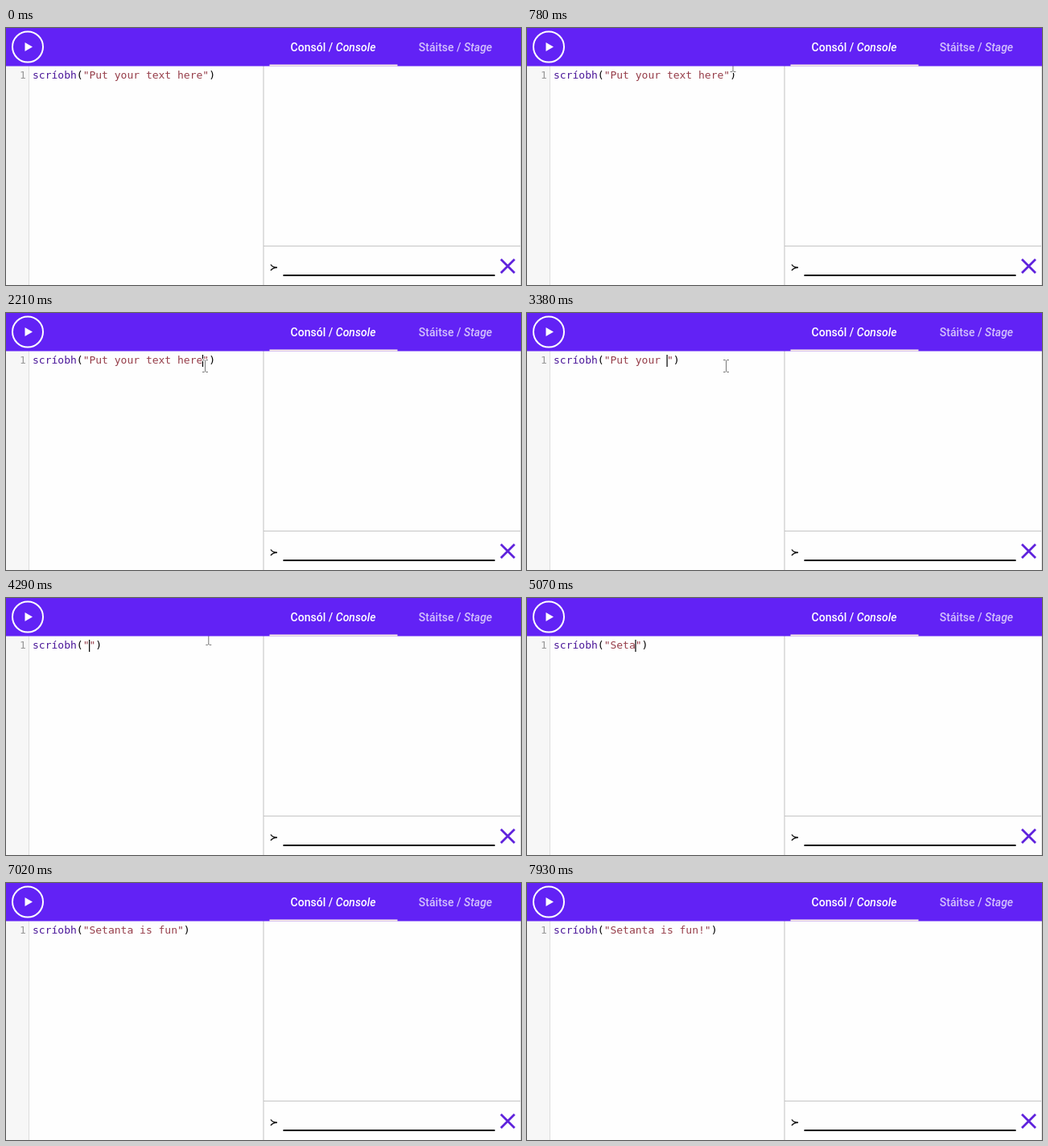
Animation, 640 px wide and 320 px high, one loop 8000 ms. Source, as an HTML page:

```html
<!DOCTYPE html>
<html lang="ga">
<head>
<meta charset="utf-8">
<title>Editor</title>
<style>
  html, body { margin: 0; width: 100%; height: 100%; overflow: hidden; background: #fefefe; }
  svg { display: block; width: 640px; height: 320px; }
  text { white-space: pre; }
  .code { font: 13px "DejaVu Sans Mono", monospace; }
  .tab { font: 500 14px Roboto, sans-serif; fill: #fff; text-anchor: middle; }
  .tab tspan { font-style: italic; }
  .fn { fill: #4a1699; }
  .str { fill: #963d49; }
</style>
</head>
<body>
<svg viewBox="0 0 640 320">
  <rect width="640" height="320" fill="#fefefe"/>

  <!-- editor -->
  <rect y="47" width="28" height="273" fill="#f7f7f7"/>
  <rect x="28" y="47" width="1" height="273" fill="#ddd"/>
  <text class="code" x="17" y="63" fill="#999">1</text>
  <text class="code" x="33" y="63"><tspan class="fn">scríobh</tspan>(<tspan class="str" id="str"></tspan>)</text>
  <rect id="caret" y="52" width="1.2" height="15"/>
  <g id="beam" fill="none" stroke-linecap="square">
    <path id="shape" d="M-3-7.5h2l1 1 1-1h2M-3 7.5h2l1-1 1 1h2M0-6.5v13" stroke="#fff" stroke-width="2.6"/>
    <use href="#shape"/>
    <path d="M-3-7.5h2l1 1 1-1h2M-3 7.5h2l1-1 1 1h2M0-6.5v13" stroke="#777" stroke-width="1"/>
  </g>

  <!-- console -->
  <rect x="319.5" y="47" width="1" height="273" fill="#c2c2c2"/>
  <rect x="320" y="271" width="320" height="1" fill="#c4c4c4"/>
  <rect x="639" y="47" width="1" height="273" fill="#e2e2e2"/>
  <path d="M329 294.5Q331 298 337 298.2Q331 298.4 329 302" fill="none" stroke="#111" stroke-width="1.4"/>
  <rect x="344.5" y="307" width="263" height="2"/>
  <path d="M615 288l17 17M632 288l-17 17" stroke="#5f22dc" stroke-width="2.8"/>

  <!-- toolbar -->
  <rect width="640" height="47.5" fill="#6222f5"/>
  <circle cx="27" cy="23.5" r="19" fill="none" stroke="#fff" stroke-width="2"/>
  <path d="M23.5 18v11l9.5-5.5z" fill="#fff"/>
  <text class="tab" x="406.5" y="29">Consól / <tspan>Console</tspan></text>
  <text class="tab" x="558.5" y="29" opacity=".72">Stáitse / <tspan>Stage</tspan></text>
  <rect x="327.5" y="45.5" width="159" height="2" fill="#fdf1e4"/>
</svg>
<script>
  const LOOP = 8000, BLINK = 520, CHAR = 7.826;
  const $ = id => document.getElementById(id);
  const str = $('str'), caret = $('caret'), beam = $('beam');

  // [time, text]; every entry also restarts the caret blink
  const edits = [
    [1950, 'Put your text here'],
    [3120, 'Put your text '],
    [3380, 'Put your '],
    [3640, 'Put '],
    [3900, ''],
    [4680, 'S'],
    [4940, 'Set']
  ];
  [...'anta is'].forEach((c, i) =>
    edits.push([5070 + i * 130, 'Set' + 'anta is'.slice(0, i + 1)]));
  edits.push(
    [5980, 'Setanta is '],
    [6240, 'Setanta is f'],
    [6370, 'Setanta is fu'],
    [6500, 'Setanta is fun'],
    [7280, 'Setanta is fun'],
    [7410, 'Setanta is fun!']
  );

  // pointer stops: [time, x, y]
  const path = [
    [390, 262, 36], [1170, 250, 58], [1560, 246, 60.5], [1820, 246, 60.5],
    [2210, 247.5, 66], [4160, 247.5, 66], [4420, 256, 36]
  ];

  function pointer(t) {
    const i = path.findIndex(p => p[0] > t);
    if (i < 1) return null;
    const [t0, x0, y0] = path[i - 1], [t1, x1, y1] = path[i];
    const k = (t - t0) / (t1 - t0);
    return [x0 + (x1 - x0) * k, y0 + (y1 - y0) * k];
  }

  function draw(t) {
    const last = edits.filter(e => e[0] <= t).pop();
    const text = last ? last[1] : edits[0][1];
    const on = last && Math.floor((t - last[0]) / BLINK) % 2 === 0;
    str.textContent = `"${text}"`;
    caret.setAttribute('x', 33 + (9 + text.length) * CHAR - 0.4);
    caret.style.display = on ? '' : 'none';

    const p = pointer(t);
    beam.style.display = p ? '' : 'none';
    if (p) beam.setAttribute('transform', `translate(${p})`);
  }

  const start = performance.now();
  function tick() {
    draw((performance.now() - start) % LOOP);
    requestAnimationFrame(tick);
  }
  tick();
</script>
</body>
</html>
```
